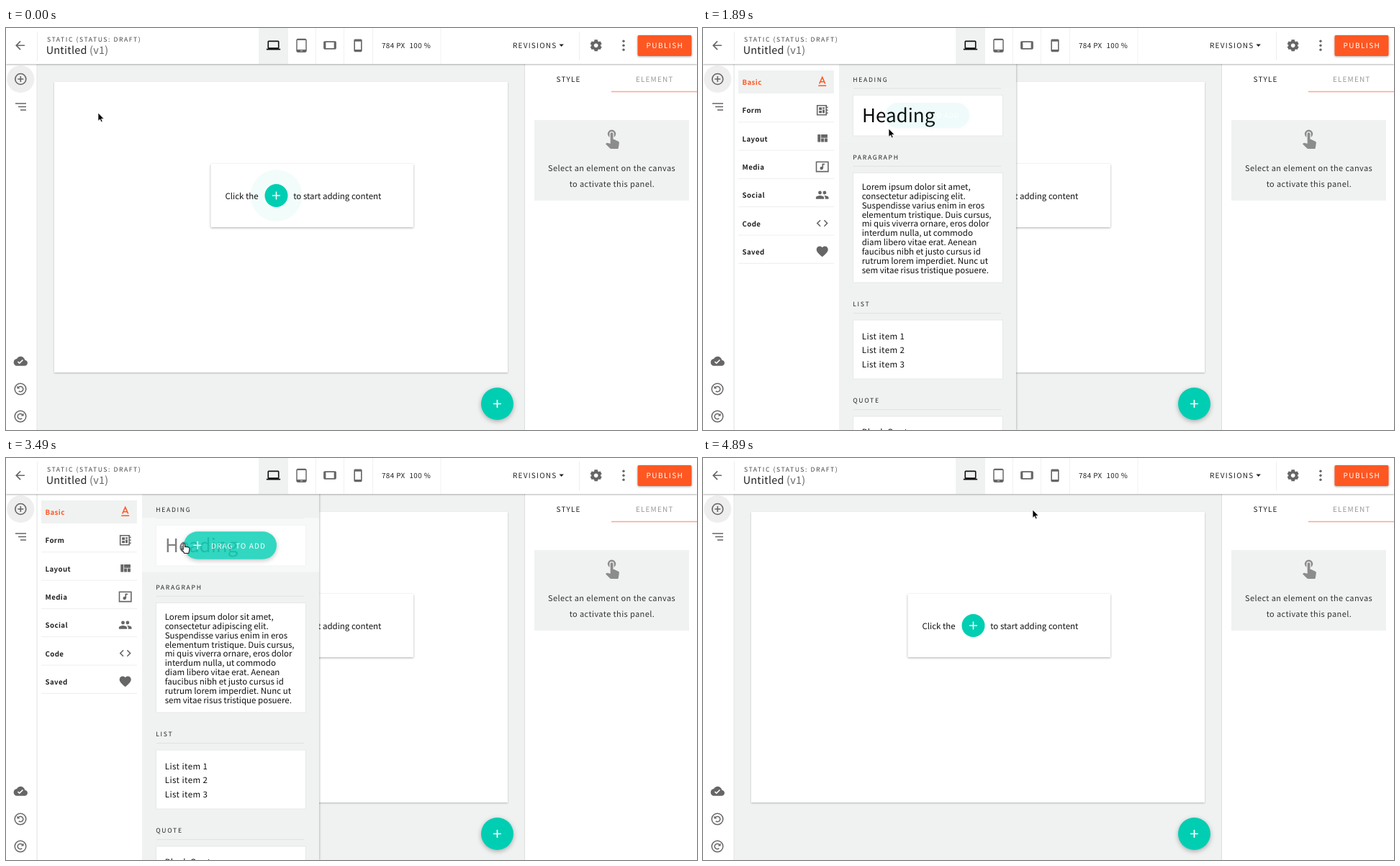
Animation, 960 px wide and 559 px high, one loop 4990 ms. Source, as an HTML page:

```html
<!DOCTYPE html>
<html lang="en">
<head>
<meta charset="utf-8">
<title>Page builder</title>
<style>
  html, body { margin: 0; width: 100%; height: 100%; overflow: hidden; background: #fff; }
  svg { display: block; width: 100%; height: 100%; }
  text {
    font-family: "Noto Sans CJK JP", "Noto Sans CJK SC", "Noto Sans CJK KR", "Noto Sans CJK TC", "Noto Sans CJK", "Open Sans", sans-serif;
    text-rendering: geometricPrecision; white-space: pre;
  }
  .lift { filter: drop-shadow(0 1.5px 1.5px rgba(0,0,0,.32)); }
  .float { filter: drop-shadow(0 2px 3px rgba(0,0,0,.3)); }
</style>
</head>
<body>
<svg id="stage" viewBox="0 0 960 559" preserveAspectRatio="none"></svg>
<script>
const LOOP = 4990;
const TEAL = '#00ceb2', ORANGE = '#ff5722', GRAY = '#f0f2f2', ICON = '#666';

// ---------- drawing helpers ----------
const rect = (x, y, x2, y2, fill, extra = '') =>
  `<rect x="${x}" y="${y}" width="${x2 - x}" height="${y2 - y}" fill="${fill}" ${extra}/>`;
const circle = (x, y, r, fill, extra = '') => `<circle cx="${x}" cy="${y}" r="${r}" fill="${fill}" ${extra}/>`;
const stroke = (d, color, width = 1.6, extra = '') =>
  `<path d="${d}" fill="none" stroke="${color}" stroke-width="${width}" ${extra}/>`;
const hline = (x, x2, y, color = '#dfe1e1', w = 1) => stroke(`M${x} ${y}H${x2}`, color, w);
const vline = (x, y, y2, color = '#ededed') => stroke(`M${x} ${y}V${y2}`, color, 1);
const text = (x, y, str, size, spacing = 0, fill = '#222', extra = '') =>
  `<text x="${x}" y="${y}" font-size="${size}" letter-spacing="${spacing}" fill="${fill}" ${extra}>${str}</text>`;
const plus = (x, y, r, color = '#fff', w = 1.7) => stroke(`M${x - r} ${y}h${2 * r}M${x} ${y - r}v${2 * r}`, color, w);
// Icon on a 24-unit grid, centred on (x, y)
const icon = (d, x, y, fill = ICON, scale = .804, turn = 0) =>
  `<path d="${d}" fill="${fill}" transform="translate(${x} ${y}) rotate(${turn}) scale(${scale}) translate(-12 -12)"/>`;
const group = (id, body, extra = '') => `<g id="${id}" ${extra}>${body}</g>`;

const ICONS = {
  back: 'M20 11H7.83l5.59-5.59L12 4l-8 8 8 8 1.41-1.41L7.83 13H20z',
  laptop: 'M20 18c1.1 0 2-.9 2-2V6c0-1.1-.9-2-2-2H4c-1.1 0-2 .9-2 2v10c0 1.1.9 2 2 2H0v2h24v-2zM4 6h16v10H4z',
  tablet: 'M18 0H6C4.3 0 3 1.3 3 3v18c0 1.7 1.3 3 3 3h12c1.7 0 3-1.3 3-3V3c0-1.7-1.3-3-3-3zm-4 22h-4v-1h4zm5.2-3H4.8V3h14.4z',
  phone: 'M17 1H7C5.9 1 5 1.9 5 3v18c0 1.1.9 2 2 2h10c1.1 0 2-.9 2-2V3c0-1.1-.9-2-2-2zm0 18H7V5h10z',
  cloud: 'M19.4 10C18.7 6.6 15.6 4 12 4 9.1 4 6.6 5.6 5.4 8 2.3 8.4 0 10.9 0 14c0 3.3 2.7 6 6 6h13c2.8 0 5-2.2 5-5 0-2.6-2-4.8-4.6-5zM10 17l-3.5-3.5 1.4-1.4 2.1 2.1L15.2 9l1.4 1.4z',
  touch: 'M9 11.2V7.5a2.5 2.5 0 0 1 5 0v3.7a4.5 4.5 0 1 0-5 0zm9.8 4.7l-4.5-2.3-.5-.1H13v-6a1.5 1.5 0 0 0-3 0v10.7l-3.7-.7-.8.3-.8.8 5 5 1 .4h6.8c.8 0 1.3-.5 1.4-1.3l.8-5.3c0-.7-.3-1.3-.9-1.5z',
  quilt: 'M10 18h5v-6h-5zm-6 0h5V5H4zm12 0h5v-6h-5zM10 5v6h11V5z',
  people: 'M16 11a3 3 0 1 0 0-6 3 3 0 0 0 0 6zM8 11a3 3 0 1 0 0-6 3 3 0 0 0 0 6zM8 13c-2.3 0-7 1.2-7 3.5V19h14v-2.5C15 14.2 10.300 13 8 13zm8 0h-1c1.200.8 2 2 2 3.500V19h6v-2.500C23 14.200 18.300 13 16 13z',
  code: 'M9.4 16.600L4.800 12l4.600-4.600L8 6l-6 6 6 6zm5.200 0l4.600-4.600-4.600-4.600L16 6l6 6-6 6z',
  heart: 'M12 21.300l-1.500-1.300C5.400 15.400 2 12.300 2 8.500 2 5.400 4.400 3 7.500 3c1.700 0 3.400.8 4.500 2.100C13.100 3.800 14.800 3 16.500 3 19.600 3 22 5.400 22 8.500c0 3.800-3.400 6.900-8.500 11.500z'
};

function gear(x, y) {
  const teeth = [0, 60, 120].map(a => `<path d="M0 -8V-4M0 8V4" stroke-width="4.6" transform="rotate(${a})"/>`).join('');
  return `<g transform="translate(${x} ${y})" fill="none" stroke="${ICON}">${teeth}<circle r="4.7" stroke-width="3.6"/></g>`;
}

const historyIcon = (y, flip) => `<g transform="translate(20 ${y}) scale(${flip} 1)">
  ${circle(0, 0, 7.8, 'none', `stroke="${ICON}" stroke-width="1.5"`)}
  ${stroke('M-2.8 -2.2A3.700 3.700 0 1 1 -2.300 2.900', ICON, 1.5)}
  <path d="M-4.600 -4.500V-.5H-.6z" fill="${ICON}"/></g>`;

// ---------- page parts ----------
function canvasArea() {
  return rect(43, 50, 721, 559, GRAY) +
    rect(67, 75, 697, 479, '#fff', 'style="filter:drop-shadow(0 1px 1px rgba(0,0,0,.25))"') +
    rect(284.5, 189, 566, 277, '#fff', 'class="lift" rx="1"') +
    circle(375.5, 233, 36, TEAL, 'id="pulse"') + circle(375.5, 233, 16, TEAL) + plus(375.5, 233, 5.5, '#fff', 1.5) +
    text(304.4, 237.8, 'Click the', 11.5, 0, '#111') +
    text(399.2, 237.8, 'to start adding content', 11.5, 0, '#111') +
    circle(682.5, 522.5, 22.5, TEAL, 'class="float"') + plus(682.5, 522.5, 5.5);
}

function stylePanel() {
  return rect(721, 50, 960, 559, '#fff') + vline(720.5, 50, 559, '#dcdede') +
    text(764.5, 74.5, 'STYLE', 10.07, 1.15, '#222') + text(875, 74.5, 'ELEMENT', 10.07, 1.1, '#999') +
    hline(841, 960, 88.5, '#fba78c', 1.5) + rect(734, 128, 949, 240, GRAY) +
    icon(ICONS.touch, 842.2, 152.9, '#8c8c8c', 1.26) +
    text(753, 198.8, 'Select an element on the canvas', 11, .4, '#333') +
    text(782.7, 221.2, 'to activate this panel.', 11, .4, '#333');
}

function menuIcon(name, y) {
  const x = 165.7;
  switch (name) {
    case 'Basic':
      return stroke(`M${x - 4} ${y + 2.500}L${x} ${y - 6.500}L${x + 4} ${y + 2.500}M${x - 2.700} ${y - .3}h5.400`, ORANGE, 1.6) +
        hline(x - 5.500, x + 5.500, y + 5.300, ORANGE, 1.6);
    case 'Form':
      return stroke(`M${x - 7} ${y - 6.500}h12.500v13h-12.500z`, ICON) +
        stroke(`M${x + 5} ${y - 4}h3M${x + 5} ${y}h3M${x + 5} ${y + 4}h3`, ICON) +
        rect(x - 4.600, y - 4, x - .6, y - .4, ICON) + rect(x - 4.600, y + .8, x - .6, y + 4, ICON) +
        rect(x + .4, y - 4, x + 3.200, y - 1.800, ICON) + rect(x + .4, y - .8, x + 3.200, y + 4, ICON);
    case 'Media':
      return stroke(`M${x - 8.200} ${y - 6.700}h16.400v13.400h-16.400z`, ICON) +
        circle(x - 1, y + 2, 2.200, ICON) + stroke(`M${x + .6} ${y + 2}v-5.500h2.800`, ICON, 1.7);
    default: {
      const shape = { Layout: 'quilt', Social: 'people', Code: 'code', Saved: 'heart' }[name];
      return icon(ICONS[shape], x, y);
    }
  }
}

function categoryMenu() {
  const names = ['Basic', 'Form', 'Layout', 'Media', 'Social', 'Code', 'Saved'];
  return rect(43, 50, 189, 559, '#fff') + rect(49, 59, 182, 91, GRAY) + names.map((name, i) => {
    const y = 75 + 39.300 * i;
    return text(54.500, y + 4, name, 9.700, .4, i ? '#222' : ORANGE, 'font-weight="700"') + menuIcon(name, y) +
      (i ? hline(49, 182, y + 16.500, '#eceeee') : '');
  }).join('');
}

function elementList() {
  const lorem = ['Lorem ipsum dolor sit amet,', 'consectetur adipiscing elit.', 'Suspendisse varius enim in eros',
    'elementum tristique. Duis cursus,', 'mi quis viverra ornare, eros dolor', 'interdum nulla, ut commodo',
    'diam libero vitae erat. Aenean', 'faucibus nibh et justo cursus id', 'rutrum lorem imperdiet. Nunc ut',
    'sem vitae risus tristique posuere.'];
  const section = (title, y, bottom) => text(208.200, y, title, 8.640, 1.700, '#222') +
    hline(209, 414, y + 9.500) + rect(208.500, y + 18.800, 416.500, bottom, '#fff', 'stroke="#e6e9e9"');
  return rect(189, 50, 435, 559, GRAY, 'style="filter:drop-shadow(1px 0 1px rgba(0,0,0,.22))"') +
    section('HEADING', 74.500, 150) + text(221, 131, 'Heading', 26, 0, '#000') +
    section('PARAGRAPH', 182.700, 354) +
    lorem.map((line, i) => text(220.700, 225 + 12.850 * i, line, 11.520, 0, '#111')).join('') +
    section('LIST', 387.200, 488) +
    [1, 2, 3].map(n => text(220.700, 413.500 + 19.350 * n, 'List item ' + n, 11.520, .45, '#111')).join('') +
    section('QUOTE', 521.200, 600) + text(220.700, 566, 'Block Quote', 11.520, .45, '#111');
}

function dragHover(id, top, bottom, y) {
  return group(id + 'Veil', rect(189, top, 435, bottom, '#fff')) +
    group(id + 'Pill', rect(-64.500, -19.300, 64.500, 19.300, TEAL, 'rx="19.3" class="float"') +
      plus(-45.500, 0, 5.500) + text(-26.500, 4, 'DRAG TO ADD', 10.070, 1.100, '#fff'), `data-y="${y}"`);
}

function sidebar() {
  return rect(0, 50, 43, 559, '#fff') + vline(43, 50, 559, '#e2e4e4') +
    circle(20.300, 71, 19, '#eee') + circle(20.300, 71, 15, '#000', 'id="ripple"') +
    circle(20.300, 71, 7.500, 'none', `stroke="${ICON}" stroke-width="1.600"`) + plus(20.300, 71, 4, ICON, 1.600) +
    stroke('M13 105H28M17 109.500H28M20 114H28', ICON, 1.600) +
    icon(ICONS.cloud, 20.300, 463.300) + historyIcon(502, 1) + historyIcon(540, -1);
}

function header() {
  const phoneTone = '#666';
  return rect(0, 0, 960, 50, '#fff', 'style="filter:drop-shadow(0 1px 1px rgba(0,0,0,.3))"') +
    icon(ICONS.back, 19.500, 24.300) + vline(43.500, 5, 46) +
    text(57, 19.200, 'STATIC (STATUS: DRAFT)', 8.640, 1.550, '#444') +
    text(55.700, 36.300, 'Untitled <tspan fill="#666">(v1)</tspan>', 14.400, .25, '#222') +
    rect(351, 0, 391, 50, GRAY) + [391.500, 430.500, 469.500, 509.500, 604].map(x => vline(x, 0, 50, '#f0f1f1')).join('') +
    icon(ICONS.laptop, 371.500, 24, '#111') + icon(ICONS.tablet, 410.500, 24.300, phoneTone) +
    icon(ICONS.phone, 450, 24, phoneTone, .804, 90) + icon(ICONS.phone, 489, 24.300, phoneTone) +
    text(522, 28.300, '784 PX', 9.850, .4) + text(560.500, 28.300, '100 %', 9.850, .4) +
    text(704, 28.300, 'REVISIONS', 10.070, 1.200) + '<path d="M768.500 22.500h6.400l-3.200 3.600z" fill="#222"/>' +
    vline(796.500, 5, 45) + gear(819.700, 24.300) + [18.300, 24.300, 30.300].map(y => circle(858, y, 1.700, ICON)).join('') +
    rect(877.500, 10, 952.500, 39, ORANGE, 'rx="2" class="lift"') + text(889.500, 28.300, 'PUBLISH', 10.070, 1.400, '#fff');
}

const tooltip = () => `<path d="M39 71.500L43.500 67V59H136V84H43.500V76z" fill="${TEAL}"/>` +
  text(51.700, 75, 'ADD ELEMENT', 8.400, 1.550, '#fff', 'font-weight="700"');

const pointer = () =>
  group('arrow', '<path d="M0 0V11.300L2.600 8.900 4.300 12.700 6.100 11.900 4.500 8.300H8z" fill="#000" stroke="#fff" stroke-width=".7"/>') +
  group('hand', '<path d="M3.200 9V1.600Q4.300 0 5.500 1.600V5.500Q6.800 4.600 7.800 5.800 9 5 9.900 6.200 11.600 5.600 11.800 7.400V10.500Q11 12.500 10.800 14.500H4.800Q4 12.500 .6 8.900 .8 7.100 3.200 9z" fill="#fff" stroke="#222" stroke-width="1.100"/>');

document.getElementById('stage').innerHTML =
  '<clipPath id="besideBar"><rect x="43.500" y="50" width="676" height="509"/></clipPath>' +
  canvasArea() + stylePanel() +
  group('drawerClip', group('drawer', elementList() + dragHover('heading', 83.500, 158.500, 121.500) +
    dragHover('paragraph', 192, 362.500, 278) + categoryMenu()), 'clip-path="url(#besideBar)"') +
  sidebar() + header() + group('tooltip', tooltip()) + group('pointer', pointer());

// ---------- motion ----------
const el = id => document.getElementById(id);
const clamp = v => Math.min(1, Math.max(0, v));
const ease = v => v * v * (3 - 2 * v);
const ramp = (t, from, to) => ease(clamp((t - from) / (to - from)));
const during = (t, start, end, fadeIn, fadeOut) => ramp(t, start, start + fadeIn) - ramp(t, end, end + fadeOut);
const setOpacity = (id, v) => el(id).setAttribute('opacity', v.toFixed(3));
const move = (id, transform) => el(id).setAttribute('transform', transform);

// Pointer stops: time, x, y
const STOPS = [[0, 128, 118], [60, 128, 118], [560, 15, 58], [1490, 14, 59], [1890, 258, 140], [2060, 259, 146], [2440, 267, 261],
  [2690, 267, 261], [2990, 264, 225], [3390, 243, 118], [3690, 243, 118], [4160, 20, 65], [4690, 20, 65], [4890, 458, 72], [LOOP, 458, 72]];
const HAND_TIMES = [[440, 1560], [1960, 2140], [2250, 2990], [3150, 3740], [4080, 4720]];

function pointerAt(t) {
  const i = Math.max(1, STOPS.findIndex(s => s[0] > t));
  const [t0, x0, y0] = STOPS[i - 1], [t1, x1, y1] = STOPS[i];
  const p = ramp(t, t0, t1);
  return [x0 + (x1 - x0) * p, y0 + (y1 - y0) * p];
}

function hover(id, amount) {
  setOpacity(id + 'Veil', amount * .5);
  setOpacity(id + 'Pill', amount * .8);
  move(id + 'Pill', `translate(311.500 ${el(id + 'Pill').dataset.y}) scale(${.9 + .1 * amount})`);
}

function render(t) {
  const open = during(t, 1190, 4380, 270, 270);
  move('drawer', `translate(${(open - 1) * 394} 0)`);
  el('drawerClip').style.display = open > 0 ? '' : 'none';

  hover('heading', clamp(during(t, 1855, 2130, 220, 200) + during(t, 3130, 3690, 220, 200)));
  hover('paragraph', during(t, 2230, 3000, 220, 200));

  setOpacity('tooltip', during(t, 500, 1150, 150, 120));
  setOpacity('ripple', .12 * (during(t, 1000, 1200, 80, 300) + during(t, 4260, 4420, 80, 250)));
  setOpacity('pulse', .05 * (1 - ramp(t, 40, 350)));
  el('pulse').setAttribute('r', 36 + 4 * clamp(t / 350));

  const [x, y] = pointerAt(t);
  move('pointer', `translate(${x.toFixed(2)} ${y.toFixed(2)})`);
  const isHand = HAND_TIMES.some(([from, to]) => t >= from && t < to);
  el('hand').style.display = isHand ? '' : 'none';
  el('arrow').style.display = isHand ? 'none' : '';
}

const start = performance.now();
function tick(now) {
  render(Math.max(0, now - start) % LOOP);
  requestAnimationFrame(tick);
}
render(0);
requestAnimationFrame(tick);
</script>
</body>
</html>
```
